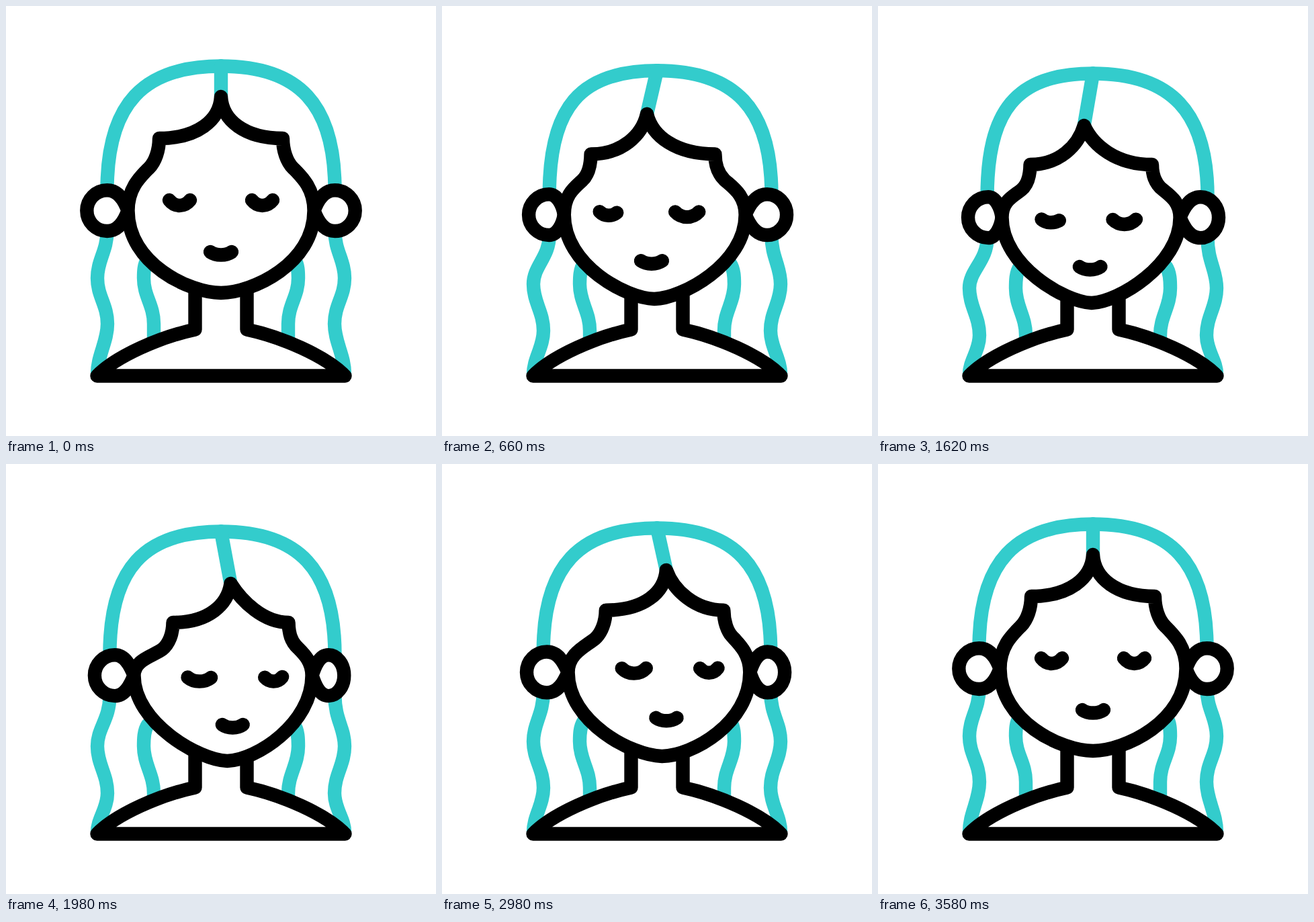
Recreate the animation shown at these times as an HTML page. Size 640 by 640 pixels, loop 3.6 s.

```html
<!DOCTYPE html>
<html lang="en">
<head>
<meta charset="utf-8">
<title>Head turn</title>
<style>
  html, body { margin: 0; width: 100%; height: 100%; overflow: hidden; background: #fff; }
  svg { display: block; width: 100vw; height: 100vh; }
  path { fill: none; stroke: #000; stroke-width: 20.4; stroke-linecap: round; stroke-linejoin: round; }
  .hair { stroke: #33cccc; }
  .solid { fill: #fff; }
</style>
</head>
<body>
<svg id="stage" viewBox="0 0 640 640"></svg>
<script>
const stage = document.getElementById('stage');
const DURATION = 3600;
const EASE = 'cubic-bezier(.5, 0, .5, 1)';
const SOFT = 'cubic-bezier(.4, 0, .65, .95)';

function addPath(cls, d) {
  const el = document.createElementNS('http://www.w3.org/2000/svg', 'path');
  el.setAttribute('class', cls);
  el.setAttribute('d', d);
  stage.append(el);
  return el;
}

// Morphs front -> left -> right -> front.
function morph(cls, front, left, right, sweep = EASE) {
  const eases = [EASE, sweep, EASE, EASE];
  const frames = [front, left, right, front].map((d, i) => ({ d: `path("${d}")`, easing: eases[i] }));
  addPath(cls, front).animate(frames, { duration: DURATION, iterations: Infinity });
}

const mirror = side => n => 320 + side * n;

// x: hair position at the ear, d: 0 upright, 1 nodded.
function lock(side, x, d) {
  const X = mirror(side), top = 89.5 + 11 * d, low = 15 * d;
  return `M320 ${top}C${X(116)} ${top} ${x} ${146 + 11 * d} ${x} ${274 + 10 * d}` +
    `L${x} ${335 + 10 * d}C${x} ${365 + low} ${X(184)} ${378 + low} ${X(184)} ${405 + low}` +
    `C${X(184)} ${432 + low} ${X(169)} ${445 + 17 * d} ${X(169)} ${473 + 17 * d}` +
    `C${X(169)} ${500 + 13 * d} ${X(184)} ${520 + 8 * d} ${X(184)} 548`;
}

function strand(side, d) {
  const X = mirror(side), low = 15 * d;
  return `M${X(109)} ${376 + 12 * d}C${X(115)} ${385 + 12 * d} ${X(115)} ${396 + 14 * d} ${X(115)} ${405 + low}` +
    `C${X(115)} ${432 + low} ${X(100)} ${445 + 17 * d} ${X(100)} ${473 + 17 * d}L${X(100)} 502`;
}

// end: where it meets the face, mid: top and bottom, out: far edge, lean: handle tilt.
function ear(end, mid, out, y, lean) {
  const r = 30.4, k = 0.55, cx = mid + k * (out - mid), ex = mid + 0.54 * (end - mid);
  return `M${end} ${y}C${end + lean} ${y - 14} ${ex} ${y - r} ${mid} ${y - r}` +
    `C${cx} ${y - r} ${out} ${y - k * r} ${out} ${y}C${out} ${y + k * r} ${cx} ${y + r} ${mid} ${y + r}` +
    `C${ex} ${y + r} ${end + lean} ${y + 14} ${end} ${y}Z`;
}

// A short smile-shaped arc; dip is the height of its lowest point.
function arc(x1, y1, x2, y2, dip) {
  const w = (x2 - x1) * 0.27, low = y => y + (dip - y) * 4 / 3;
  return `M${x1} ${y1}C${x1 + w} ${low(y1)} ${x2 - w} ${low(y2)} ${x2} ${y2}`;
}

const part = (x, y, top) => `M320 ${top}L${x} ${y}`;

// Hair
for (const s of [-1, 1]) morph('hair', strand(s, 0), strand(s, 1), strand(s, 1));
morph('hair', lock(-1, 150.5, 0), lock(-1, 166, 1), lock(-1, 151, 1));
morph('hair', lock(1, 489.5, 0), lock(1, 491, 1), lock(1, 489, 1));
morph('hair', part(320, 135, 89.5), part(295, 178, 100.5), part(346, 178, 100.5));

// Shoulders
addPath('solid', 'M281.5 420V481.5C230 492.5 164 521 135.5 550.5H504.5C476 521 410 492.5 358.5 481.5V420');

// Ears
morph('solid', ear(181.5, 150.5, 120.3, 304.6, -5), ear(182, 165, 134.9, 314.7, 0), ear(193, 161, 131, 314.7, -7));
morph('solid', ear(458.5, 489.5, 519.7, 304.6, 5), ear(447, 480, 508.6, 314.7, 6), ear(458, 480, 501.7, 314.7, 4));

// Face: peak, left fringe, jaw, right fringe
morph('solid',
  'M320 135C318 170 285 197 228 197C228 215 222 232 213 241C200 254 181.5 271 181.5 304.6' +
  'C181.5 384 273 426.5 320 427C367 426.5 458.5 384 458.5 304.6' +
  'C458.5 271 440 254 427 241C418 232 412 215 412 197C355 197 322 170 320 135Z',
  'M295 178C284.6 207 257 236 217.3 236C217 254 213.5 266 205 273C193 283 182 290 182 314.7' +
  'C182 387 275 441 313.3 442C350 441 447 385 447 314.7' +
  'C447 288 427 280 415.4 270C408.5 263 402.7 254 402.7 236C343 236 307 209.5 295 178Z',
  'M346 178C343 210 315 236 257.6 236C257.6 252 251 269 240.3 277C226 287 193 292 193 314.7' +
  'C193 385 292 441 334 442C379 441 458 387 458 314.7' +
  'C458 292 443 279 435.5 270C430.5 264 426 252 425.8 236C395 236 364 203 346 178Z');

// Eyes and mouth
morph('', arc(243, 289, 274, 289, 297), arc(229.2, 317.5, 251, 320, 321.5), arc(289.5, 317.5, 330, 317, 324.5), SOFT);
morph('', arc(366, 289, 397, 289, 297), arc(334.5, 318, 372.5, 318, 325.5), arc(400, 317.5, 422.5, 316.5, 323));
morph('', arc(304, 366, 336, 366, 370.5), arc(290.6, 388, 322.5, 388, 392.5), arc(331, 388, 361.5, 388, 392.5));

// Start all parts together.
const now = document.timeline.currentTime || 0;
for (const a of document.getAnimations()) a.startTime = now;
</script>
</body>
</html>
```
